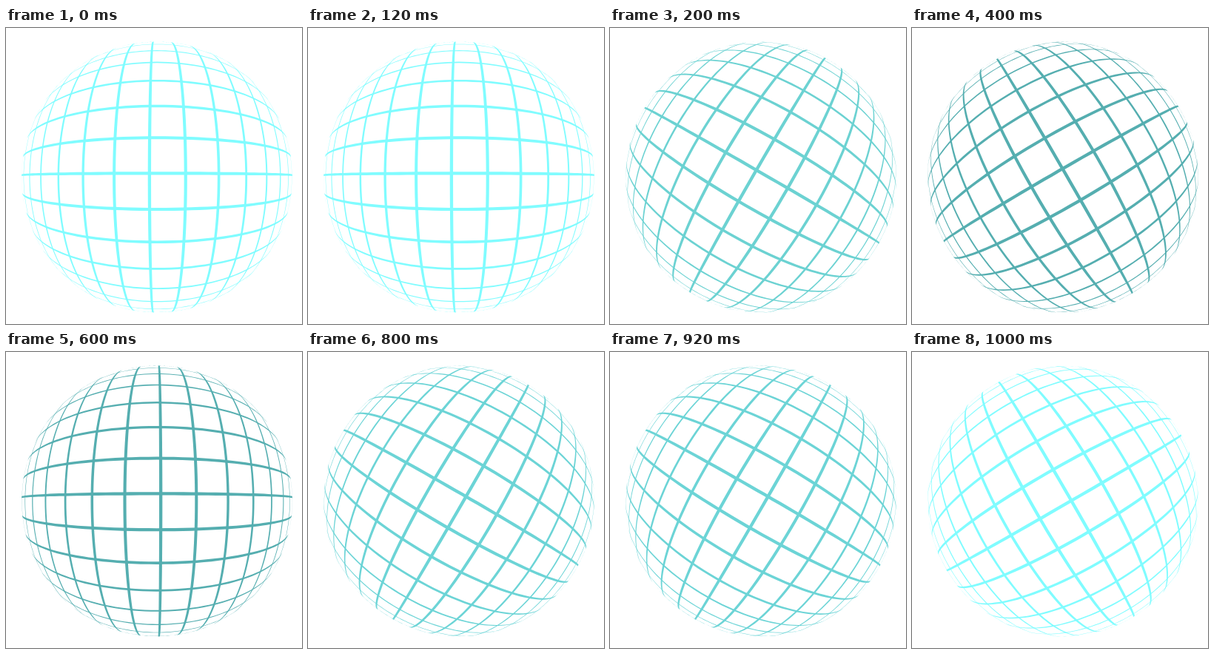
These frames come from a looping animation (400 by 400 pixels, 1200 ms). An HTML page:

```html
<!DOCTYPE html>
<html lang="en">
<head>
<meta charset="utf-8">
<title>Turning grid sphere</title>
<style>
  html, body { margin: 0; width: 100%; height: 100%; overflow: hidden; background: #fff; }
  svg { display: block; width: 100%; height: 100%; }
</style>
</head>
<body>
<svg viewBox="0 0 400 400">
  <g id="globe">
    <path id="rows"/>
    <path id="cols"/>
  </g>
</svg>
<script>
  const CX = 204, CY = 201.5, RADIUS = 183;
  const CELL = 0.2695;        // grid spacing on the flat plane
  const HALF = 0.044 * CELL;  // half the line width
  const LIMIT = 1.97;         // the rim lies at 2
  const STEP_MS = 200, STEPS = 6;
  const COLORS = ['#80fcff', '#6cd2d2', '#55aeb0', '#55aeb0', '#6cd4d6', '#80fcff'];

  const globe = document.getElementById('globe');

  // Stereographic plane point to its place on the sphere, seen from the front.
  function bulge(u, v) {
    const k = RADIUS / (1 + (u * u + v * v) / 4);
    return [u * k, v * k];
  }

  function edge(v, upright) {
    const reach = Math.sqrt(Math.max(0, LIMIT * LIMIT - v * v));
    const points = [];
    for (let i = 0; i <= 60; i++) {
      const u = reach * (i / 30 - 1);
      const [x, y] = upright ? bulge(v, u) : bulge(u, v);
      points.push(x.toFixed(2) + ' ' + y.toFixed(2));
    }
    return points;
  }

  function strips(offset, upright) {
    let d = '';
    for (let n = -8; n <= 8; n++) {
      const v = (n + offset) * CELL;
      if (Math.abs(v) + HALF >= LIMIT) continue;
      const outline = edge(v - HALF, upright).concat(edge(v + HALF, upright).reverse());
      d += 'M' + outline.join('L') + 'Z';
    }
    return d;
  }

  document.getElementById('rows').setAttribute('d', strips(-0.105, false));
  document.getElementById('cols').setAttribute('d', strips(-0.205, true));

  function draw(ms) {
    const step = Math.floor(ms / STEP_MS) % STEPS;
    globe.setAttribute('transform', `translate(${CX} ${CY}) rotate(${step * 30})`);
    globe.setAttribute('fill', COLORS[step]);
  }

  const start = performance.now();
  function tick() {
    draw(performance.now() - start);
    requestAnimationFrame(tick);
  }
  tick();
</script>
</body>
</html>
```
